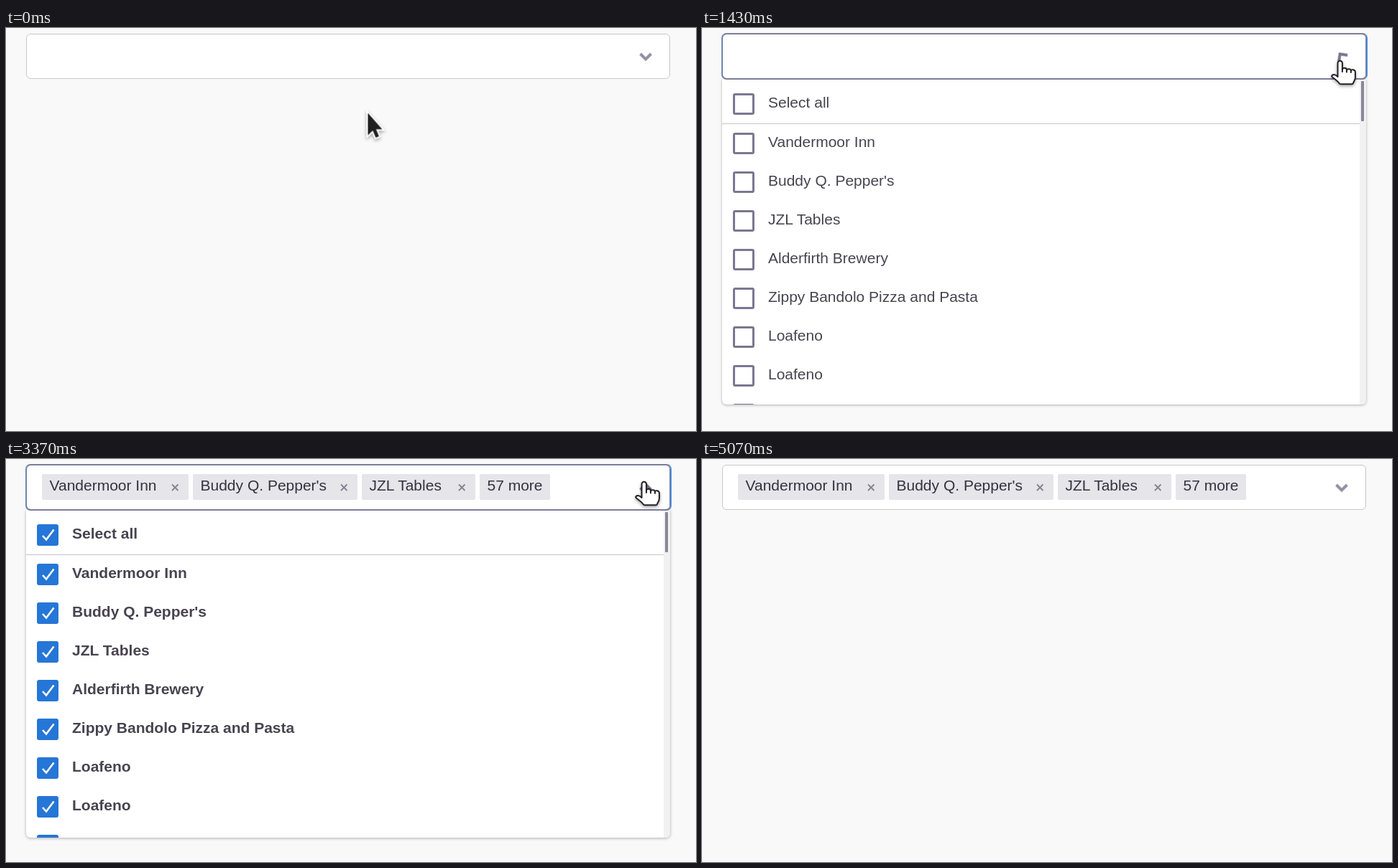
An HTML page for the animation above (5.56 s loop, 960 by 562 pixels).

```html
<!DOCTYPE html>
<html lang="en">
<head>
<meta charset="utf-8">
<title>Multi-select</title>
<style>
  :root { --loop: 5560ms; --ink: #7a7790; --blue: #2576d6; }
  html, body { margin: 0; width: 100%; height: 100%; overflow: hidden; background: #f9f9f9; }
  #stage { position: relative; width: 960px; height: 562px; overflow: hidden; }
  #stage > * { position: absolute; box-sizing: border-box; }
  svg { display: block; overflow: visible; }
  text { font: 21px "Liberation Sans", Arial, sans-serif; fill: #47444f; }

  .field { left: 28px; top: 8px; width: 896px; height: 63px; background: #fff;
    border: 1px solid #c9c9c9; border-radius: 6px; animation: hover-border var(--loop) infinite; }
  .ring { left: 27px; top: 7px; width: 899px; height: 65px; border: 2px solid;
    border-color: #7b7d98 #4d88d4 #7b7d98 #6c85b4; border-radius: 7px;
    animation: focus var(--loop) infinite; }
  .layer { left: 0; top: 0; }
  .tags rect { fill: #e5e5ea; }
  .tags text { fill: #35323f; }
  .tags path { stroke: #85828f; stroke-width: 1.8; }
  .chevron { fill: none; stroke: #918ea3; stroke-width: 4;
    animation: flip var(--loop) infinite, hover-stroke var(--loop) infinite; }

  .panel { left: 28px; top: 71px; width: 896px; overflow: hidden; background: #fff;
    border-radius: 0 0 6px 6px; animation: open var(--loop) infinite; }
  .row-hover { fill: #f3f3f5; animation: row-hover var(--loop) step-end infinite; }
  .box { fill: #fff; stroke: var(--ink); stroke-width: 3; animation: fill-box var(--loop) infinite; }
  .tick { fill: none; stroke: #fff; stroke-width: 2.6; stroke-dasharray: 1 2;
    animation: draw var(--loop) infinite; }
  .bold text { font-weight: bold; }
  .before { animation: before var(--loop) step-end infinite; }
  .after { animation: after var(--loop) step-end infinite; }

  .cursor { left: 0; top: 0; filter: drop-shadow(0 2px 2px rgba(0,0,0,.35));
    animation: travel var(--loop) infinite; }
  .arrow { fill: #1f1f1f; stroke: #fff; stroke-width: 4; paint-order: stroke;
    animation: arrow var(--loop) step-end infinite; }
  .hand { fill: #fff; stroke: #222; stroke-width: 2; stroke-linejoin: round; stroke-linecap: round;
    animation: hand var(--loop) step-end infinite; }

  @keyframes travel {
    0%, 4.6% { transform: translate(490px, 117px); animation-timing-function: cubic-bezier(.45,.05,.5,.97); }
    14.388% { transform: translate(867px, 55px); animation-timing-function: ease-out; }
    17.9% { transform: translate(875px, 45px); }
    29.3% { transform: translate(875px, 45px); animation-timing-function: cubic-bezier(.5,0,.8,.8); }
    32.914% { transform: translate(735px, 83px); animation-timing-function: cubic-bezier(.2,.6,.4,1); }
    37.2% { transform: translate(697px, 98px); }
    53.4% { transform: translate(697px, 98px); animation-timing-function: cubic-bezier(.6,0,.85,.7); }
    57.554% { transform: translate(778px, 71px); animation-timing-function: cubic-bezier(.2,.6,.4,1); }
    60.6% { transform: translate(875px, 31px); }
    82.7% { transform: translate(875px, 31px); animation-timing-function: ease-in; }
    87.3%, 100% { transform: translate(872px, -50px); }
  }
  @keyframes arrow { 0% { opacity: 1 } 11.2% { opacity: 0 } 100% { opacity: 0 } }
  @keyframes hand { 0% { opacity: 0 } 11.2% { opacity: 1 } 100% { opacity: 1 } }
  @keyframes hover-border {
    0%, 11.2% { border-color: #c9c9c9 }
    14%, 86.7% { border-color: #8a88a5 }
    91%, 100% { border-color: #c9c9c9 }
  }
  @keyframes hover-stroke {
    0%, 11.2% { stroke: #918ea3 }
    14%, 86.7% { stroke: #78758e }
    91%, 100% { stroke: #918ea3 }
  }
  @keyframes focus {
    0%, 23.36% { opacity: 0 }
    25%, 77.1% { opacity: 1 }
    79.8%, 100% { opacity: 0 }
  }
  @keyframes flip {
    0%, 23.5% { transform: rotate(0); animation-timing-function: ease; }
    28% { transform: rotate(180deg); }
    77.1% { transform: rotate(180deg); animation-timing-function: ease; }
    81.6%, 100% { transform: rotate(0); }
  }
  @keyframes open {
    0%, 23.36% { height: 0; box-shadow: 0 0 0 rgba(0,0,0,0); }
    23.38% { height: 8px; animation-timing-function: ease-out; }
    25.9% { height: 457px; box-shadow: 0 1px 4px rgba(0,0,0,.3); }
    77.1% { height: 457px; box-shadow: 0 1px 4px rgba(0,0,0,.3); animation-timing-function: ease; }
    80.3%, 80.7% { height: 9px; box-shadow: 0 0 0 rgba(0,0,0,0); }
    80.72%, 100% { height: 0; box-shadow: 0 0 0 rgba(0,0,0,0); }
  }
  @keyframes row-hover { 0% { opacity: 0 } 32.7% { opacity: 1 } 57.2% { opacity: 0 } 100% { opacity: 0 } }
  @keyframes before { 0% { opacity: 1 } 48% { opacity: 0 } 100% { opacity: 0 } }
  @keyframes after { 0% { opacity: 0 } 48% { opacity: 1 } 100% { opacity: 1 } }
  @keyframes fill-box {
    0%, 47.99% { fill: #fff; stroke: var(--ink); }
    48% { fill: #659fe2; stroke: #8798bd; }
    50.4%, 100% { fill: var(--blue); stroke: var(--blue); }
  }
  @keyframes draw {
    0%, 48% { stroke-dashoffset: .93 }
    51.6%, 100% { stroke-dashoffset: 0 }
  }
</style>
</head>
<body>
<div id="stage">
  <div class="field"></div>
  <div class="panel">
    <svg width="896" height="457" viewBox="28 71 896 457">
      <rect class="row-hover" x="28" y="80" width="887" height="53"/>
      <rect x="28" y="133" width="887" height="1" fill="#c6c6cc"/>
      <rect x="915" y="71" width="9" height="457" fill="#f1f1f2"/>
      <rect x="917" y="74" width="4" height="56" rx="1" fill="#8a8799"/>
      <g id="boxes"></g>
      <g id="plain" class="before"></g>
      <g id="bold" class="bold after"></g>
    </svg>
  </div>
  <div class="ring"></div>
  <svg class="layer" width="960" height="80">
    <g id="tags" class="tags after"></g>
    <g transform="translate(890 39.5)"><path class="chevron" d="M-7.5-3.5 0 4 7.5-3.5"/></g>
  </svg>
  <svg class="cursor" width="40" height="42">
    <path class="arrow" transform="translate(13.5 1.5)" d="M0 0V31L6.8 24.6 11 34.5 15.5 32.6 11.4 22.8H20Z"/>
    <g class="hand">
      <path d="M9.5 23V4a3.2 3.2 0 0 1 6.4 0V13c0-3 6-3 6 0v1c0-2.5 6-2.5 6 .5c0-2 6-2 6 2V24c0 4-2 5-3 8q-.4 1.200-1.500 1.200H13.500q-1.200 0-1.800-1C9.500 28.500 3 25 1 22.500C2 19 6 19 9.500 23Z"/>
      <path fill="none" d="M15.900 12v4M21.900 13v3.500M27.900 14.500v2.500"/>
    </g>
  </svg>
</div>
<script>
  const names = ["Vandermoor Inn", "Buddy Q. Pepper's", "JZL Tables", "Alderfirth Brewery",
    "Zippy Bandolo Pizza and Pasta", "Loafeno", "Loafeno", ""];
  const get = id => document.getElementById(id);
  const label = (x, y, s) => `<text x="${x}" y="${y}">${s}</text>`;

  const rows = ["Select all", ...names].map((name, i) => ({ name, y: i ? 92 + 54 * i : 91 }));
  const labels = rows.map(({ name, y }) => label(92, y + 20, name)).join("");
  get("plain").innerHTML = get("bold").innerHTML = labels;
  get("boxes").innerHTML = rows.map(({ y }) => `<g transform="translate(43 ${y})">
    <rect class="box" x="1.5" y="1.5" width="27" height="27" rx="1.5"/>
    <g class="after"><path class="tick" pathLength="1" d="M8 16 13 21.500 23.500 7.500"/></g></g>`).join("");

  const tag = (x, width, s, closable) =>
    `<rect x="${x}" y="21" width="${width}" height="36" rx="2"/>` + label(x + 10.5, 44, s) +
    (closable ? `<path d="M${x + width - 23} 35.500l8.500 8.500m0-8.500l-8.500 8.500"/>` : "");
  get("tags").innerHTML = tag(50, 204, names[0], true) + tag(260, 229, names[1], true) +
    tag(495, 158, names[2], true) + tag(659, 98, "57 more", false);
</script>
</body>
</html>
```
